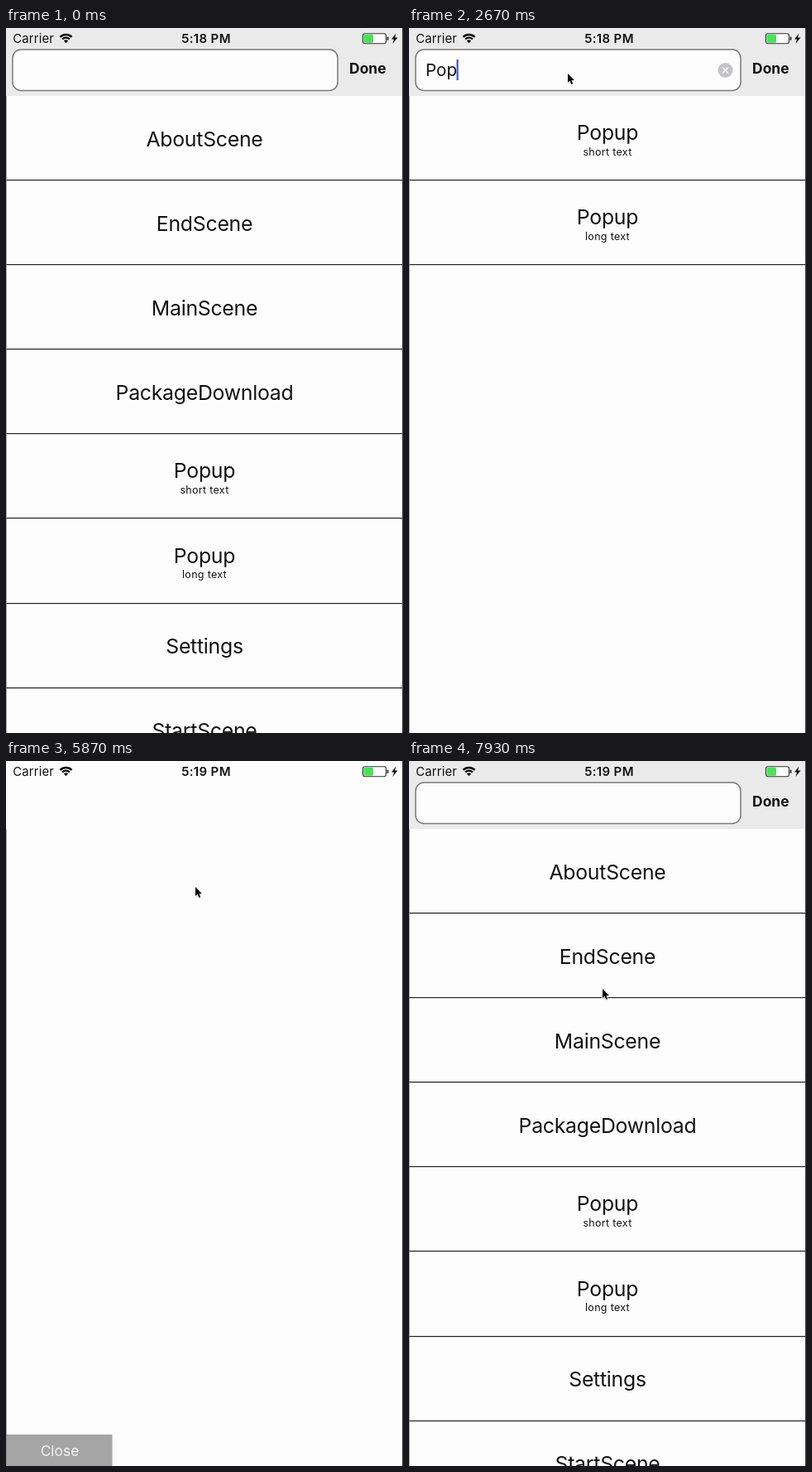
Write an HTML page with a canvas that moves like this. It is 480 by 851 pixels and loops after 8 s.

```html
<!DOCTYPE html>
<html>
<head>
<meta charset="utf-8">
<style>
html, body { margin: 0; width: 480px; height: 851px; overflow: hidden; background: #fefdfe; }
canvas { display: block; }
</style>
</head>
<body>
<canvas id="stage" width="480" height="851"></canvas>
<script>
const c = document.getElementById('stage').getContext('2d');
const LOOP = 8000, PAPER = '#fefdfe', INK = '#111';
const OPEN = 5700, CLOSE = 7530, FOCUS = 1200, BLUR = 4900;
const ROWS = [['AboutScene'], ['EndScene'], ['MainScene'], ['PackageDownload'],
  ['Popup', 'short text'], ['Popup', 'long text'], ['Settings'], ['StartScene']];
const KEYS = [[2200, 'P'], [2470, 'Po'], [2530, 'Pop'], [2870, 'Popu'], [3070, 'Popup']];
// time, x, y of the pointer tip
const PATH = [[70, 432, 736], [870, 192, 55], [3600, 192, 55], [4050, 252, 243], [4400, 251, 241],
  [4570, 249, 148], [5400, 249, 148], [5530, 271, 148], [5670, 271, 148], [5860, 229, 152],
  [6560, 229, 152], [7300, 42, 834], [7530, 42, 834], [7920, 234, 275]];

const clamp = v => Math.max(0, Math.min(1, v));
const ease = v => v * v * (3 - 2 * v);

function rect(x, y, w, h, fill) {
  c.fillStyle = fill;
  c.fillRect(x, y, w, h);
}

function box(x, y, w, h, r, fill, stroke, line) {
  c.beginPath();
  c.roundRect(x, y, w, h, r);
  if (fill) { c.fillStyle = fill; c.fill(); }
  if (stroke) { c.strokeStyle = stroke; c.lineWidth = line; c.stroke(); }
}

function poly(points, fill) {
  c.beginPath();
  points.forEach(p => c.lineTo(...p));
  c.closePath();
  c.fillStyle = fill;
  c.fill();
}

function text(s, x, y, size, { weight = 400, color = INK, align = 'center', gap = 0 } = {}) {
  c.font = `${weight} ${size}px Inter, Roboto, sans-serif`;
  c.letterSpacing = gap + 'px';
  c.textAlign = align;
  c.fillStyle = color;
  c.fillText(s, x, y);
  return c.measureText(s).width;
}

function statusBar(t) {
  text('Carrier', 8.3, 18, 14.9, { align: 'left', gap: 0.15 });
  text(t < 3000 ? '5:18 PM' : '5:19 PM', 242, 18, 15, { weight: 600, gap: 0.35 });
  c.strokeStyle = INK;
  c.lineWidth = 2.3;
  for (const r of [6.3, 10]) {
    c.beginPath();
    c.arc(72.5, 18, r, -Math.PI * 0.75, -Math.PI * 0.25);
    c.stroke();
  }
  c.beginPath();
  c.moveTo(72.5, 18.3);
  c.arc(72.5, 18, 3.6, -Math.PI * 0.75, -Math.PI * 0.25);
  c.fillStyle = INK;
  c.fill();
  box(431.5, 6.8, 28, 12, 2.5, PAPER, '#333', 1.1);
  box(432.5, 7.8, 11.5, 10, 1.5, '#4be05b');
  box(460.5, 10.5, 2, 4.5, 1, '#333');
  poly([[471.5, 6.5], [466, 13.5], [469, 13.5], [467.5, 19], [473.5, 11.5], [470.2, 11.5]], INK);
}

function search(t, query, lastKey) {
  const focused = t >= FOCUS && t < BLUR;
  box(8, 26, 393, 49.5, 10, PAPER, '#7b7a7b', 1.5);
  text('Done', 437.3, 55, 17.4, { weight: 700 });
  const w = query ? text(query, 20, 57.5, 20.6, { align: 'left' }) : 0;
  if (!focused) return;
  const beat = (t - lastKey) % 1000;
  c.globalAlpha = clamp(1 - (beat - 550) / 80);
  rect(20 + w - (w ? 0.5 : 0), 38, 2.2, 25, '#4254cc');
  c.globalAlpha = 1;
  if (!query) return;
  box(373.5, 42, 18, 18, 9, '#c4c3c7');
  c.strokeStyle = PAPER;
  c.lineWidth = 1.7;
  c.beginPath();
  for (const d of [-1, 1]) {
    c.moveTo(379, 51 - 3.5 * d);
    c.lineTo(386, 51 + 3.5 * d);
  }
  c.stroke();
}

function listScene(t) {
  const [lastKey, query] = t < CLOSE && KEYS.filter(k => k[0] <= t).pop() || [FOCUS, ''];
  ROWS.filter(r => r[0].startsWith(query)).forEach(([title, note], i) => {
    const y = 133 + i * 102.1;
    text(title, 240, y + (note ? 2 : 9.5), 24.8, { gap: -0.25 });
    if (note) text(note, 240, y + 20.5, 12.5, { gap: 0.3 });
    rect(0, Math.round(y + 50), 480, 1.2, '#222');
  });
  rect(0, 0, 480, 82, '#ebeaeb');
  search(t, query, lastKey);
}

function popupScene(t) {
  const shown = ease(clamp((t - 5950) / 400));
  c.globalAlpha = shown;
  c.save();
  c.filter = 'blur(1.5px)';
  for (let i = 0; i < 14; i++) {
    if (i < 7) rect(45.5 + i * 63.2, -5, 7, 861, '#e3dffb');
    rect(-5, 9.5 + i * 63, 490, 7, '#e3dffb');
  }
  c.restore();
  box(14, 25.5, 452, 812, 0, PAPER, '#c9c8d6', 1);
  text('Here is the text', 240, 394, 21.9, { gap: -0.1 });
  rect(14, 748.5, 452, 89, '#757376');
  text('Button', 239.7, 802.5, 25, { weight: 600, color: PAPER });
  c.globalAlpha = 1;
  rect(0, 813, 128.5, 38, `rgba(0, 0, 0, ${0.35 + 0.07 * shown})`);
  text('Close', 65, 838.5, 17.4, { color: '#f4f3f4' });
}

function pointer(t) {
  if (t < 70) return;
  const i = PATH.findLastIndex(p => p[0] <= t);
  const a = PATH[i], b = PATH[i + 1] || a;
  const k = b === a ? 0 : ease((t - a[0]) / (b[0] - a[0]));
  c.save();
  c.translate(a[1] + (b[1] - a[1]) * k, a[2] + (b[2] - a[2]) * k);
  c.shadowColor = 'rgba(0, 0, 0, 0.35)';
  c.shadowBlur = 2;
  c.shadowOffsetY = 1;
  const arrow = [[0, 0], [0, 11], [2.5, 8.8], [4.3, 13], [6.2, 12.2], [4.5, 8.2], [7.8, 8]];
  poly(arrow, '#000');
  c.shadowColor = 'transparent';
  c.strokeStyle = '#fff';
  c.lineWidth = 1.6;
  c.stroke();
  poly(arrow, '#000');
  c.restore();
}

function draw(now) {
  const t = now % LOOP;
  rect(0, 0, 480, 851, PAPER);
  if (t >= OPEN && t < CLOSE) popupScene(t);
  else listScene(t);
  statusBar(t);
  rect(0, 82, 0.7, 769, '#8a898a');
  rect(479, 0, 1, 851, '#444');
  pointer(t);
}

const start = performance.now();
function tick() {
  draw(performance.now() - start);
  requestAnimationFrame(tick);
}
tick();
</script>
</body>
</html>
```
